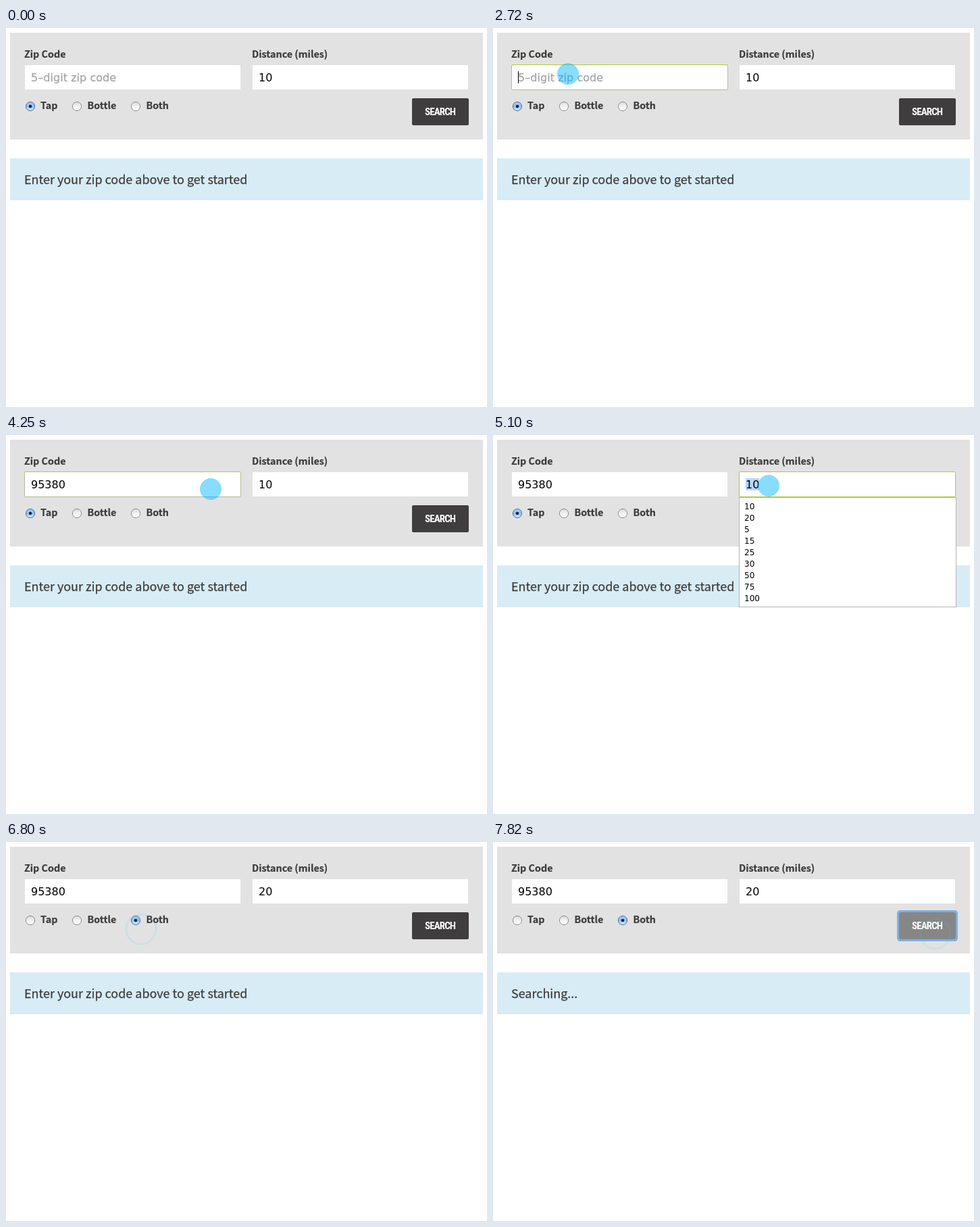
Write an HTML page that moves like this. It is 712 px wide and 561 px high and loops after 7.99 s.

```html
<!DOCTYPE html>
<html lang="en">
<head>
<meta charset="utf-8">
<title>Zip code search</title>
<style>
html, body { margin: 0; width: 100%; height: 100%; overflow: hidden; background: #fff; }
svg { display: block; }
text { font-family: "Noto Sans CJK JP", "Noto Sans CJK SC", "Noto Sans CJK", "Noto Sans", sans-serif; fill: #3c3b39; white-space: pre; }
.label { font-size: 14.32px; font-weight: 700; stroke: #3c3b39; stroke-width: .2px; }
.message { font-size: 17.97px; stroke: #3c3b39; stroke-width: .25px; }
.value { font: 16px "DejaVu Sans", sans-serif; fill: #000; }
.hint { fill: #a6a6a6; stroke: #a6a6a6; stroke-width: .3px; letter-spacing: .05px; }
.item { font: 12px "DejaVu Sans", sans-serif; fill: #000; }
.search { font: 700 15px "Roboto Condensed", "Open Sans Condensed", "Open Sans", sans-serif; font-stretch: 75%; letter-spacing: -.9px; fill: #fff; text-anchor: middle; }
</style>
</head>
<body>
<svg id="stage" width="712" height="561" viewBox="0 0 712 561">
  <defs>
    <linearGradient id="off" x2="0" y2="1"><stop stop-color="#d8d8d8"/><stop offset=".5" stop-color="#f2f2f2"/><stop offset="1" stop-color="#fff"/></linearGradient>
    <linearGradient id="on" x2="0" y2="1"><stop stop-color="#a9cbee"/><stop offset=".5" stop-color="#8fc0ee"/><stop offset="1" stop-color="#d3f1ff"/></linearGradient>
    <filter id="soft"><feGaussianBlur stdDeviation=".7"/></filter>
  </defs>
  <g id="scene"></g>
</svg>
<script>
const LOOP = 7990, TICK = 170, RING = 510;
const scene = document.getElementById('scene');

// Pointer paths: [time, x, y]; the pointer is hidden between the runs.
const runs = [
  { end: 1020, keys: [[340, 121, 8], [510, 119, 40], [680, 108, 66], [850, 96, 82]] },
  { end: 4590, keys: [[1530, 97, 88], [1870, 97, 84], [2210, 111, 68], [4080, 111, 68], [4250, 303, 80], [4420, 400, 58]] },
  { end: 6460, keys: [[5100, 408, 75], [5610, 408, 75], [5780, 392, 82], [5950, 235, 120], [6120, 117, 129], [6290, 165, 132]] },
  { end: 7480, keys: [[6970, 235, 126], [7140, 470, 122], [7310, 673, 123]] }
];
const clicks = [[1020, 96, 82], [4590, 400, 56], [6460, 200, 129], [7480, 655, 136]];
const miles = [10, 20, 5, 15, 25, 30, 50, 75, 100];

const within = (t, from, to) => t >= from && t < to;
const rect = (x, y, w, h, fill, more = '') =>
  `<rect x="${x}" y="${y}" width="${w}" height="${h}" fill="${fill}" ${more}/>`;
const text = (x, y, kind, str) => `<text x="${x}" y="${y}" class="${kind}">${str}</text>`;

function field(x, value, focused, caret, sides) {
  let out = rect(x + 1, 55, 319, 36, '#fff');
  if (focused) {
    out += rect(x + .5, 54.5, 320, 37, '#fff', `rx="1.5" stroke="${sides}"`)
      + rect(x + 1, 54, 319, 1, '#a6ce39');
  }
  out += value ? text(x + 10, 79, 'value', value) : text(x + 10, 79, 'value hint', '5–digit zip code');
  if (caret) out += rect(x + 10 + Math.round(value.length * 10.2), 64, 1, 18, '#000');
  return out;
}

function radio(x, label, labelX, checked) {
  return `<circle cx="${x}" cy="116" r="6.6" fill="url(#${checked ? 'on' : 'off'})" stroke="${checked ? '#506f9a' : '#8c8c8c'}"/>`
    + (checked ? `<circle cx="${x}" cy="116" r="2.3" fill="#14233c"/>` : '')
    + text(labelX, 120, 'label', label);
}

function menu(x, items) {
  return rect(x + .5, 92.5, 321, items.length * 17 + 9, '#fff', 'stroke="#b4b4b4"')
    + items.map((item, i) => text(x + 8, 110 + i * 17, 'item', item)).join('');
}

function button(hover, focused) {
  const glow = focused
    ? rect(599.5, 102.5, 87, 43, 'none', 'rx="3" stroke="#7fb0e4" stroke-width="3" filter="url(#soft)"') : '';
  return glow + rect(601, 104, 84, 40, hover ? '#868686' : '#403d3e', 'rx="2"')
    + text(642.6, 129, 'search', 'SEARCH');
}

function pointer(t) {
  const run = runs.find(r => within(t, r.keys[0][0], r.end));
  if (!run) return '';
  const keys = run.keys;
  let i = keys.length - 1;
  while (keys[i][0] > t) i--;
  const a = keys[i], b = keys[i + 1] || a;
  const p = b === a ? 0 : (t - a[0]) / (b[0] - a[0]);
  const mix = k => a[k] + (b[k] - a[k]) * p;
  return `<circle cx="${mix(1)}" cy="${mix(2)}" r="16" fill="#00b7ff" fill-opacity=".47"/>`;
}

function ring(t) {
  const click = clicks.find(c => within(t, c[0], c[0] + RING));
  if (!click) return '';
  const p = (t - click[0]) / (RING - TICK);
  return `<circle cx="${click[1]}" cy="${click[2]}" r="${14 + 8 * p}" fill="none" stroke="#3cc8e8" stroke-width="3" opacity="${.7 - .58 * p}"/>`;
}

function draw(t) {
  const typed = t < 2890 ? 0 : t < 3230 ? 1 : Math.min(5, 2 + Math.floor((t - 3230) / TICK));
  const zip = '95380'.slice(0, typed);
  const distance = t < 5440 ? '10' : t < 5780 ? '2' : '20';
  const both = t >= 6630;
  const sent = t >= 7650;

  scene.innerHTML = rect(6, 7, 700, 158, '#e2e2e2')
    + rect(6, 193, 700, 62, '#d8ecf5')
    + text(27, 44, 'label', 'Zip Code')
    + text(364, 44, 'label', 'Distance (miles)')
    + field(27, zip, within(t, 1700, 4590), within(t, 1700, 2210) || within(t, 2720, 4250), '#b1bc98')
    + field(364, distance, within(t, 4590, 6460), within(t, 5440, 6290), '#a6ce39')
    + (within(t, 4930, 5440) ? rect(374, 64, 20, 18, '#b5d5ff', 'style="mix-blend-mode:multiply"') : '')
    + radio(36, 'Tap', 51, !both)
    + radio(105, 'Bottle', 120.5, false)
    + radio(192, 'Both', 207.5, both)
    + button(t >= 7310, sent)
    + text(27, 231, 'message', sent ? 'Searching...' : 'Enter your zip code above to get started')
    + (within(t, 2890, 3740) ? menu(27, ['95380']) : '')
    + (within(t, 4760, 5270) ? menu(364, miles) : '')
    + pointer(t) + ring(t);
}

const start = performance.now();
let shown = -1;
function tick() {
  const now = (performance.now() - start) % LOOP;
  const t = Math.floor(now / TICK) * TICK;
  if (t !== shown) draw(shown = t);
  requestAnimationFrame(tick);
}
tick();
</script>
</body>
</html>
```
